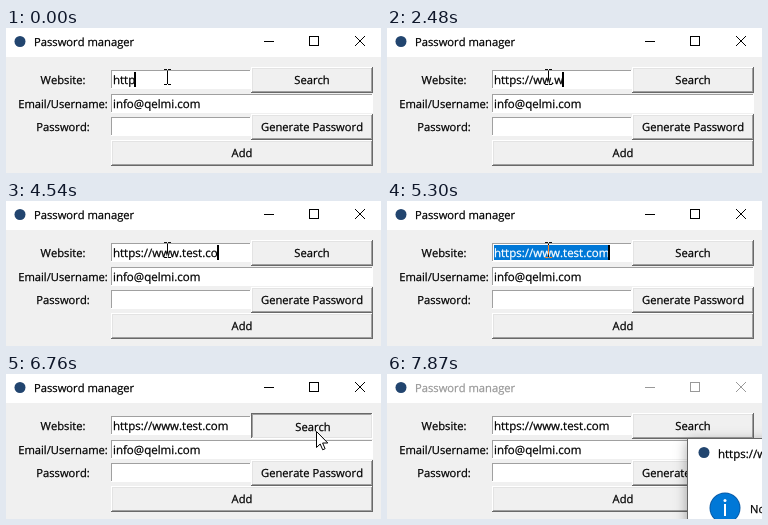
Recreate the animation shown at these times as an HTML page with a canvas. Size 375 by 145 pixels, loop 7.99 s.

```html
<!DOCTYPE html>
<html lang="en">
<head>
<meta charset="utf-8">
<title>Password manager</title>
<style>
html, body { margin: 0; width: 375px; height: 145px; overflow: hidden; background: #f0f0f0; }
canvas { display: block; }
</style>
</head>
<body>
<canvas id="stage" width="375" height="145"></canvas>
<script>
const ctx = document.getElementById('stage').getContext('2d');
const LOOP = 7990, FIELD_X = 107;
const UI = 11.2, ENTRY = 11.5;
const URL_TEXT = 'https://www.test.com';

const typing = [
  [0, 'http'], [300, 'https'], [570, 'https;'], [1110, 'https'], [1410, 'https:'],
  [1710, 'https:/'], [1860, 'https://'], [2180, 'https://ww'], [2330, 'https://ww.'],
  [2480, 'https://ww.w'], [3080, 'https://ww.'], [3380, 'https://ww'], [3530, 'https://www.'],
  [3810, 'https://www.te'], [3960, 'https://www.tes'], [4110, 'https://www.test'],
  [4250, 'https://www.test.'], [4400, 'https://www.test.c'], [4540, 'https://www.test.co'],
  [4690, URL_TEXT]
];
// Caret index in the text; Infinity is the end, -1 is hidden.
const caret = [[0, Infinity], [4850, -1], [5150, 10], [5300, Infinity], [5760, 13], [6610, -1]];
const pointer = [
  [0, 'beam', 161, 41], [5620, 'beam', 180, 43], [5900, 'beam', 204, 41],
  [6040, 'beam', 234, 39], [6190, 'arrow', 288, 48], [6330, 'arrow', 307, 58],
  [6460, 'arrow', 310, 57], [7190, 'none', 0, 0]
];

const at = (track, t) => track.findLast(step => step[0] <= t);

function rect(color, x, y, w, h) {
  ctx.fillStyle = color;
  ctx.fillRect(x, y, w, h);
}

function text(str, x, y, { size = UI, align = 'left', color = '#000' } = {}) {
  setFont(size);
  ctx.textAlign = align;
  ctx.fillStyle = ctx.strokeStyle = color;
  ctx.lineWidth = 0.25;
  ctx.fillText(str, x, y);
  ctx.strokeText(str, x, y);
}

function setFont(size) {
  ctx.font = `${size}px "Open Sans", "Noto Sans", sans-serif`;
  ctx.fontKerning = 'none';
  ctx.textRendering = 'geometricPrecision';
}

function dot(color, x, y, r) {
  ctx.fillStyle = color;
  ctx.beginPath();
  ctx.arc(x, y, r, 0, 7);
  ctx.fill();
}

function bevel(x, y, w, h, topLeft, bottomRight) {
  rect(bottomRight, x, y, w, h);
  rect(topLeft, x, y, w - 1, 1);
  rect(topLeft, x, y, 1, h - 1);
}

function button(label, x, y, w, pressed) {
  const light = ['#fff', '#e3e3e3'], dark = ['#696969', '#a0a0a0'];
  const [tl, br] = pressed ? [dark, light] : [light, dark];
  bevel(x, y, w, 26, tl[0], br[0]);
  bevel(x + 1, y + 1, w - 2, 24, tl[1], br[1]);
  rect('#f0f0f0', x + 2, y + 2, w - 4, 22);
  const shift = pressed ? 1 : 0;
  text(label, x + w / 2 + shift, y + 17 + shift, { align: 'center' });
}

function entry(y, w) {
  bevel(105, y, w, 19, '#a0a0a0', '#fff');
  rect('#fff', 106, y + 1, w - 2, 17);
}

function titleBar(active) {
  const color = active ? '#000' : '#999';
  rect('#fff', 0, 0, 375, 29);
  dot('#22456f', 14, 13.5, 5.5);
  text('Password manager', 28, 18, { color });
  rect(color, 258, 13, 10, 1);
  ctx.strokeStyle = color;
  ctx.lineWidth = 1;
  ctx.strokeRect(303.5, 8.5, 9, 9);
  ctx.beginPath();
  ctx.moveTo(349, 8); ctx.lineTo(359, 18);
  ctx.moveTo(359, 8); ctx.lineTo(349, 18);
  ctx.stroke();
}

function website(t) {
  const value = at(typing, t)[1], index = at(caret, t)[1];
  const selected = t >= 5300 && t < 5760;
  entry(42, 140);
  setFont(ENTRY);
  const end = n => Math.round(FIELD_X + ctx.measureText(value.slice(0, n)).width);
  if (selected) rect('#0078d7', FIELD_X, 44, end(99) - FIELD_X, 15);
  text(value, FIELD_X, 56, { size: ENTRY, color: selected ? '#fff' : '#000' });
  if (index >= 0) rect('#000', end(Math.min(index, value.length)) - 1, 44, 2, 15);
}

function beam(x, y) {
  ctx.globalCompositeOperation = 'difference';
  for (const edge of [y, y + 15]) {
    rect('#fff', x - 3, edge, 3, 1);
    rect('#fff', x + 1, edge, 3, 1);
  }
  rect('#fff', x, y + 1, 1, 14);
  ctx.globalCompositeOperation = 'source-over';
}

function arrow(x, y) {
  ctx.save();
  ctx.translate(x + 0.5, y + 0.5);
  const shape = new Path2D('M0 0V16L3.7 12.5L6.2 18.3L8.6 17.2L6.1 11.5H11.3Z');
  ctx.fillStyle = '#fff';
  ctx.strokeStyle = '#000';
  ctx.lineWidth = 1;
  ctx.fill(shape);
  ctx.stroke(shape);
  ctx.restore();
}

function dialog(x, y, alpha) {
  ctx.save();
  ctx.globalAlpha = alpha;
  ctx.translate(x, y);
  ctx.shadowColor = 'rgba(0,0,0,.35)';
  ctx.shadowBlur = 12;
  ctx.shadowOffsetY = 3;
  rect('#666', 0, 0, 200, 150);
  ctx.shadowColor = 'transparent';
  rect('#fff', 1, 1, 199, 149);
  dot('#22456f', 17, 14.5, 5.5);
  text(URL_TEXT, 31, 20, { size: ENTRY });
  dot('#0a5ca8', 38, 70, 15.5);
  dot('#0078d7', 38, 70, 14.5);
  dot('#fff', 38, 62.5, 1.5);
  rect('#fff', 37, 66, 2, 12);
  text('No details found', 63, 75);
  ctx.restore();
}

function draw(t) {
  rect('#f0f0f0', 0, 0, 375, 145);
  titleBar(t < 7040);
  text('Website:', 57, 56, { align: 'center' });
  text('Email/Username:', 57, 80, { align: 'center' });
  text('Password:', 57, 103, { align: 'center' });
  website(t);
  entry(66, 262);
  text('info@qelmi.com', FIELD_X, 80, { size: ENTRY });
  entry(89, 140);
  button('Search', 245, 39, 122, t >= 6760 && t < 6910);
  button('Generate Password', 245, 86, 122);
  button('Add', 105, 112, 262);

  const [, kind, x, y] = at(pointer, t);
  if (kind === 'beam') beam(x, y);
  if (kind === 'arrow') arrow(x, y);

  if (t >= 7870) dialog(300, 64, 1);
  else if (t >= 7190) dialog(304, 70, 1);
  else if (t >= 7040) dialog(308, 75, 0.4);
}

const start = performance.now();
function tick() {
  draw((performance.now() - start) % LOOP);
  requestAnimationFrame(tick);
}
tick();
</script>
</body>
</html>
```
